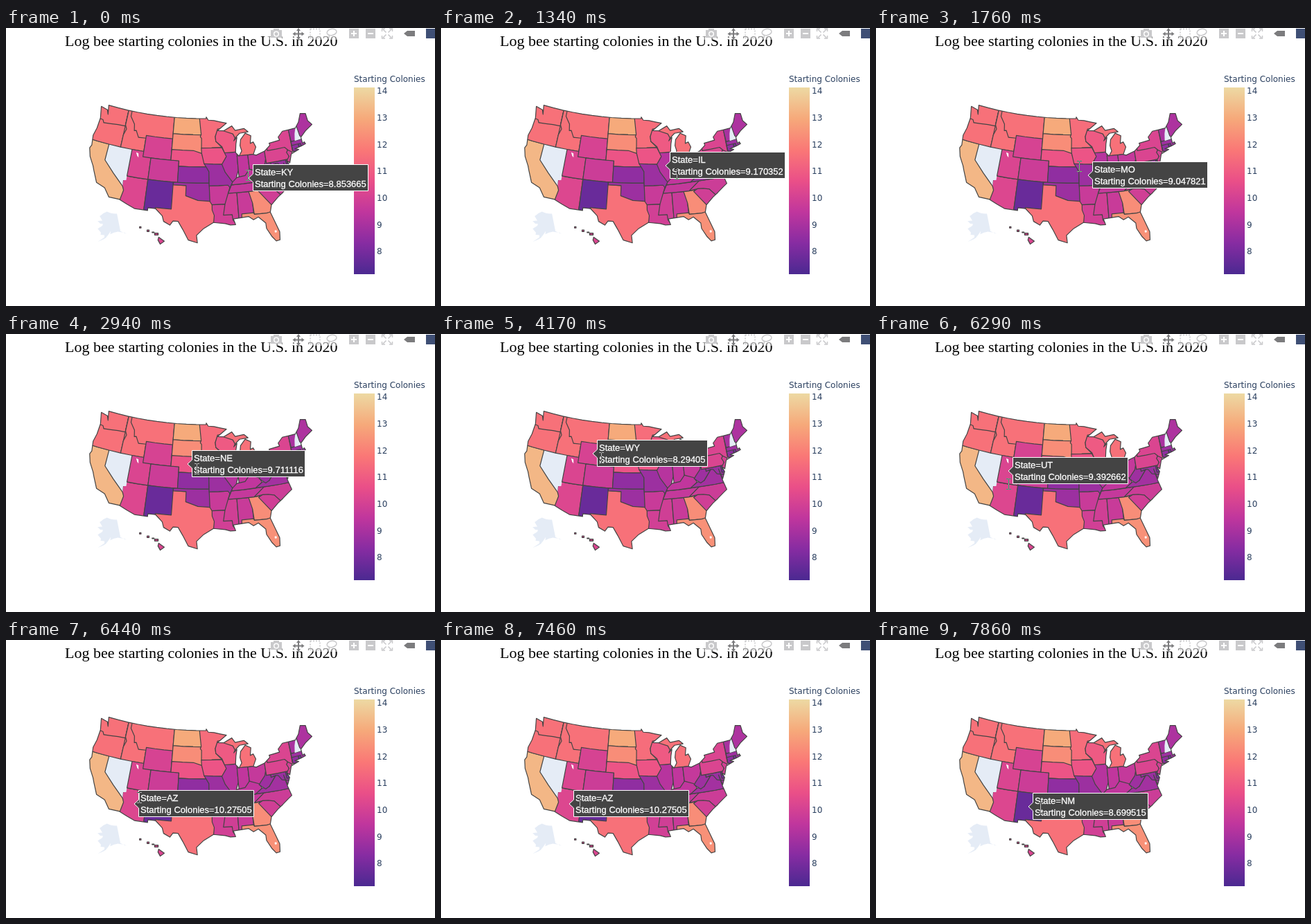
Recreate the animation shown at these times as an HTML page with a canvas. Size 619 px wide and 402 px high, loop 8000 ms.

```html
<!DOCTYPE html>
<html lang="en">
<head>
<meta charset="utf-8">
<title>Bee colonies map</title>
<style>
html, body { margin: 0; width: 100%; height: 100%; overflow: hidden; background: #fff; }
canvas { display: block; }
</style>
</head>
<body>
<canvas id="stage" width="619" height="402"></canvas>
<script>
const W = 619, H = 402, LOOP = 8000;
const LAND = '#e5ecf6', INK = '#444';
const SANS = '"Liberation Sans", Arial, sans-serif';
const SERIF = '"Liberation Serif", "Times New Roman", serif';
const WIDE = '"DejaVu Sans", Verdana, sans-serif';

// Colour scale, from lowest to highest value
const SCALE = [[75, 41, 145], [135, 44, 162], [192, 54, 157], [234, 79, 136],
  [250, 120, 118], [246, 169, 122], [237, 217, 163]];
const LOW = 7.16, HIGH = 14.13;
const BAR = { x: 502, y: 86, w: 30, h: 270 };

function colour(value) {
  const t = (value - LOW) / (HIGH - LOW) * (SCALE.length - 1);
  const i = Math.floor(t);
  return `rgb(${SCALE[i].map((c, k) => Math.round(c + (SCALE[i + 1][k] - c) * (t - i)))})`;
}

// Equal-area conic projection; puts (lonC, latC) at (px, py). West longitudes are positive.
function albers(lon0, p1, p2, k, lonC, latC, px, py) {
  const rad = Math.PI / 180, s1 = Math.sin(p1 * rad);
  const n = (s1 + Math.sin(p2 * rad)) / 2, c = 1 + s1 * (2 * n - s1);
  const raw = (lon, lat) => {
    const r = k * Math.sqrt(c - 2 * n * Math.sin(lat * rad)) / n;
    const a = (lon0 - lon) * n * rad;
    return [r * Math.sin(a), r * Math.cos(a)];
  };
  const mid = raw(lonC, latC);
  return (lon, lat) => {
    const p = raw(lon, lat);
    return [px + p[0] - mid[0], py + p[1] - mid[1]];
  };
}
const mainland = albers(96, 29.5, 45.5, 444.5, 96.6, 38.7, 281, 211.1);
const alaska = albers(154, 55, 65, 155.6, 156, 58.5, 144.9, 300.1);
const hawaii = albers(157, 8, 18, 444.5, 160, 19.9, 190.3, 305);

// Outer edge of the mainland, as "lon,lat" key points
const COAST = [
  '122.8,49 122.3,47.3 122.8,48.1 124.7,48.4 124,46.3 124.1,44.3 124.5,42.8 124.1,41 124.4,40.4 123.7,38.9 122.4,37.4 121.9,36.6 120.6,34.6 118.5,34 117.1,32.5',
  '114.8,32.5 111.1,31.3 108.2,31.3 108.2,31.8 106.5,31.8 104.9,30.6 104.5,29.6 103.1,29 102.5,29.8 101.4,29.8 100.3,28.3 99.1,26.4 97.2,25.9',
  '97.4,27.3 95.9,28.6 93.8,29.7 91.3,29.4 90.2,29.1 89.1,29.1 89.5,30.2 86.2,30.4 85.2,29.7 84.1,30.1 82.7,28.8 82.7,27.8 81.8,26.1 81.1,25.2 80.3,25.3 80.1,26.8 81.4,30.7',
  '80.9,32 79.2,33.2 77.9,33.9 76.5,34.7 75.5,35.2 76,37 76.4,39.2 75.9,37.3 75.1,38.5 75.5,39.5 74.9,39 74.1,40.5 72,41 72.9,41.3 71.2,41.5 70,41.7 70.2,42.1 70.7,41.9 70.7,43.1 69.1,44 67,44.8 67.8,45.7 67.8,47.1 69.2,47.4 70.3,45.9 71.5,45',
  '75,45 76.4,44.1 76.2,43.5 79,43.3 78.9,42.9 80.5,42 82.7,41.5 83.4,41.7 82.5,43 83,44 83.8,43.8 83.4,45.2 84.8,45.8 86.2,44.7 86.5,43.6 86.2,42.6 87,41.7 87.8,42.4 87.5,44 87.1,45.2 88,44.6 87.6,45.1 86.3,45.9 84,46 85,46.7 87.4,46.5 88.2,47.4 90.5,46.6 92.1,46.7 89.6,48 93,48.6 94.6,48.7 95.15,49.3 95.2,49'
].join(' ');

// State cells: value (none: no data), then rough outline; two points give a box.
// Later cells cover earlier ones and the coast trims them all.
const CELLS = {
  AZ: [10.27, '114.75,37 109.05,31'],
  NV: [null, '120,42 114.04,42 114.04,36.2 114.74,36.1 114.6,35 120,39'],
  CA: [13.3, '126,42 120,42 120,39 114.6,35 114.2,34.3 114.7,32 126,32'],
  WA: [11.6, '126,50 117.03,45.6'],
  OR: [11.6, '126,46.3 123.2,46.1 122.8,45.6 119,45.95 116.9,46 116.5,45.5 117,44.3 117,42 126,42'],
  MT: [11.6, '117,50 104.05,44.4'],
  ID: [11.6, '117,50 116.05,50 116.05,48 114.7,46.7 114.4,45.5 113.9,45.6 113,44.4 111.05,44.5 111.05,42 117,42 117,44.3 116.5,45.5 117,46.2'],
  UT: [10.2, '114.04,42 109.05,37'],
  WY: [10.1, '111.05,45 104.05,41'],
  CO: [9.8, '109.05,41 102.05,37'],
  TX: [11.6, '107,36.5 93,25'],
  NM: [7.75, '109.05,37 103.05,37 103.05,32 106.6,32 106.6,31 109.05,31'],
  ND: [13, '104.05,50 96,45.94'],
  SD: [12.3, '104.05,45.94 96,42.3'],
  NE: [10.8, '104.05,43 98.5,43 96.4,42.5 95.3,40 102.05,40 102.05,41 104.05,41'],
  KS: [8.5, '102.05,40 94.62,37'],
  OK: [8.75, '103,37 94.6,37 94.45,33.65 97.2,33.8 100,34.6 100,36.5 103,36.5'],
  MI: [11.6, '90.5,48 82,41.73'],
  IL: [9.3, '92,42.5 87.5,42.5 87.5,39.1 88.1,37.8 88.1,36.9 92,36.9'],
  MN: [11.5, '97.2,50 89,50 89,48 92.1,46.75 92.8,45.6 92.7,44.7 91.2,43.5 96.45,43.5 96.45,45.3 96.8,45.6 96.55,46'],
  WI: [10.95, '92.1,47 90.4,47 90.4,46.55 88.1,45.9 87.6,45.1 86.5,45.3 87,42.5 90.6,42.5 91.2,43.7 92.7,44.7 92.8,45.6'],
  IA: [10.8, '96.5,43.5 91.2,43.5 90.2,41.8 91.4,40.4 95.8,40.6 96.4,42.5'],
  MS: [9.9, '91.7,35 88.3,30'],
  AR: [9.7, '94.6,36.5 89.6,36.5 90.3,35 91.15,33 94.04,33 94.5,33.6'],
  LA: [9.95, '94.04,33 91.15,33 91.6,31 89.7,31 89.6,30 88,28 94,28 93.6,31 94.04,32'],
  MO: [8.75, '95.8,40.6 91.4,40.4 90.7,38.9 89.1,37 89.8,36 90.2,36.5 94.62,36.5 94.62,39.1 95.3,40'],
  AL: [9.7, '88.3,35 85,30'],
  GA: [12.3, '85.6,35 83,35 80,32 80.5,30.6 84.9,30.7 85,32.8'],
  FL: [12.4, '87.6,31 85,31 84.9,30.7 82.2,30.6 81,30.8 79,25 88,25'],
  IN: [9.5, '87.5,41.76 84.8,37.7'],
  OH: [9.6, '84.8,41.73 83.4,41.73 80.52,42.3 80.52,38 84.8,38'],
  TN: [9.6, '90.3,35 84.3,35 81.7,36.6 89.4,36.5'],
  KY: [9.5, '89.4,36.5 83.7,36.6 82,37.5 82.6,38.4 84.8,39.1 86,38 88,37.8 89.1,37'],
  NC: [9.8, '84.3,35 82.3,35.2 79.7,34.8 78,33 75,35 75,36.55 81.7,36.6'],
  SC: [9.9, '83.3,34.8 82.3,35.2 81,35.1 79.7,34.8 78,33 80.9,32 82.6,34'],
  MD: [8.7, '79.48,39.72 75,38'],
  DE: [8, '75.79,39.8 75,38.45'],
  VA: [8.9, '83.7,36.6 75,36.55 75,37.9 77,38.4 77.7,39.3 78.3,39.4 80.3,37.6 82,37.5'],
  WV: [8.8, '82.6,38.2 81.2,37.25 80.3,37.6 78.3,39.4 79.48,39.2 79.48,39.72 80.52,39.72 80.52,40.6 80.9,39.7 82.2,38.6'],
  PA: [10.2, '80.52,42.3 74.8,39.72'],
  NJ: [10, '74.7,41.4 73.8,41 74,39 75.5,39 75.5,39.5 74.75,40.2 75.15,41'],
  NY: [10.2, '79.76,42 75.35,42 74.7,41.4 73.9,40.9 71.5,40.5 71.5,41.2 73.6,41.1 73.35,45.2 79.76,45.2'],
  VT: [9, '73.4,45.1 71.5,42.73'],
  MA: [8.8, '73.45,42.75 69.5,41'],
  CT: [8.5, '73.5,42.03 71.8,40.9'],
  RI: [8, '71.8,42.02 71.2,41.2'],
  NH: [null, '72.45,42.73 72.05,44 71.5,45.01 71.1,45.3 70.6,42.8'],
  ME: [9.1, '71.08,45.3 70.9,43.4 70.5,43 66,44 67,48 71,48']
};
const ALASKA = '141,69.7 141,60.2 136,58.2 133,56 137,59 144,60.2 148,60 152,59.2 151.5,60.8 156.5,57.2 164,54.7 158,57.5 158,58.7 162,58.7 162,59.9 166,61.6 161,63.6 161,64.6 164,64.5 168,65.6 162,66.3 166.5,68.4 161.5,70.3 156.5,71.3 150,70.4';
const ISLES = ['155.9,20.25 154.8,19.5 155.6,18.93 156.05,19.7', '156.7,21 156,20.65',
  '157.2,21.2 156.8,21.1', '158.2,21.6 157.8,21.3', '159.7,22.2 159.4,21.95'];
const LAKES = ['112.9,41.6 112.3,41.5 112.1,40.75 112.5,41', '81.1,27.2 80.7,26.8'];

function outline(g, text, project) {
  let pts = text.split(' ').map(pair => pair.split(',').map(Number));
  if (pts.length === 2) {
    const [[w, n], [e, s]] = pts;
    pts = [[w, n], [e, n], [e, s], [w, s]];
  }
  g.beginPath();
  pts.forEach(([lon, lat], i) => {
    const [lon2, lat2] = pts[(i + 1) % pts.length];
    const steps = Math.ceil(Math.abs(lon2 - lon) / 3) || 1;
    for (let k = 0; k < steps; k++)
      g.lineTo(...project(lon + (lon2 - lon) * k / steps, lat + (lat2 - lat) * k / steps));
  });
  g.closePath();
}

function region(g, text, project, fill, edge) {
  outline(g, text, project);
  g.fillStyle = fill;
  g.fill();
  if (edge) g.stroke();
}

function label(g, text, x, y, font, fill) {
  g.font = font;
  g.fillStyle = fill;
  g.fillText(text, x, y);
}

function drawMap(g) {
  g.strokeStyle = INK;
  g.lineWidth = 1.2;
  g.lineJoin = 'round';
  g.save();
  outline(g, COAST, mainland);
  g.clip();
  for (const [value, cell] of Object.values(CELLS))
    region(g, cell, mainland, value ? colour(value) : LAND, value);
  g.restore();
  outline(g, COAST, mainland);
  g.stroke();
  region(g, ALASKA, alaska, LAND);
  for (const isle of ISLES) region(g, isle, hawaii, colour(10.2), true);
  for (const lake of LAKES) region(g, lake, mainland, '#fff');
}

function drawColorbar(g) {
  const { x, y, w, h } = BAR, font = `12px ${WIDE}`, navy = '#2a3f5f';
  const fade = g.createLinearGradient(0, y + h, 0, y);
  SCALE.forEach((c, i) => fade.addColorStop(i / (SCALE.length - 1), `rgb(${c})`));
  g.fillStyle = fade;
  g.fillRect(x, y, w, h);
  label(g, 'Starting Colonies', x, 78, font, navy);
  for (let v = 8; v <= 14; v++)
    label(g, v, x + w + 3, Math.round(y + h * (HIGH - v) / (HIGH - LOW) + 4), font, navy);
}

function drawToolbar(g) {
  const pale = '#c9c9cb', dark = '#7c7c7e';
  const box = (fill, x, y, w, h) => { g.fillStyle = fill; g.fillRect(x, y, w, h); };
  box('rgba(255,255,255,.5)', 378, 0, W - 378, 17);
  g.lineWidth = 1.5;

  // camera
  box(pale, 382, 3, 16, 11);
  box(pale, 386, 1, 8, 3);
  g.strokeStyle = '#fff';
  g.beginPath(); g.arc(390, 8.5, 3.3, 0, 7); g.stroke();

  // pan: one arrow in each direction
  g.fillStyle = dark;
  for (let i = 0; i < 4; i++) {
    g.save();
    g.translate(422, 8.5);
    g.rotate(i * Math.PI / 2);
    g.fillRect(-1, -6, 2, 6);
    g.beginPath(); g.moveTo(0, -8.5); g.lineTo(3, -4.5); g.lineTo(-3, -4.5); g.fill();
    g.restore();
  }

  // box and lasso select
  g.strokeStyle = pale;
  g.setLineDash([2, 2]);
  g.strokeRect(439, 1.5, 14, 13);
  g.setLineDash([]);
  g.beginPath(); g.ellipse(470, 6, 7, 4.5, -0.2, 0, 7); g.stroke();
  g.beginPath(); g.moveTo(465, 9); g.quadraticCurveTo(468, 12, 465, 15); g.stroke();

  // zoom in and out
  for (const x of [495, 519]) {
    box(pale, x, 1, 14, 14);
    box('#fff', x + 3, 7, 8, 2);
  }
  box('#fff', 501, 4, 2, 8);

  // autoscale
  for (const sx of [-1, 1]) for (const sy of [-1, 1]) {
    const at = (x, y) => [550 + sx * x, 8 + sy * y];
    g.beginPath();
    g.moveTo(...at(1.5, 1.5)); g.lineTo(...at(6, 6));
    g.moveTo(...at(3, 7)); g.lineTo(...at(7.5, 7)); g.lineTo(...at(7.5, 3));
    g.stroke();
  }

  // hover tag and badge
  box(dark, 579, 4, 11, 8);
  g.beginPath(); g.moveTo(574, 8); g.lineTo(579, 4); g.lineTo(579, 12); g.fill();
  box('#3f4f75', 606, 1, 13, 14);
}

function drawScene() {
  const layer = document.createElement('canvas');
  layer.width = W;
  layer.height = H;
  const g = layer.getContext('2d');
  g.fillStyle = '#fff';
  g.fillRect(0, 0, W, H);
  drawMap(g);
  label(g, 'Log bee starting colonies in the U.S. in 2020', 85, 26, `22px ${SERIF}`, '#000');
  drawColorbar(g);
  drawToolbar(g);
  return layer;
}

// Hover labels: start time, state, value, tip position
const HOVERS = [
  [0, 'KY', '8.853665', 350, 217], [1340, 'IL', '9.170352', 324, 199],
  [1490, 'MO', '9.047821', 306, 213], [2820, 'IA', '10.50842', 299, 187],
  [2940, 'NE', '9.711116', 262, 188], [4170, 'WY', '8.29405', 219, 173],
  [5430, 'UT', '9.392662', 191, 198], [6440, 'AZ', '10.27505', 185, 237],
  [7710, 'NM', '8.699515', 220, 241]
];

// Pointer moves: first and last step time, end position
const REST = [349, 213];
const MOVES = [
  [1340, 1760, 293, 200], [2820, 3210, 256, 189], [4020, 4470, 205, 169],
  [5310, 5580, 188, 200], [6140, 6590, 193, 233], [7460, 7860, 237, 243]
];
const STEP = 138;

function pointerAt(t) {
  let [x, y] = REST;
  for (const [start, end, toX, toY] of MOVES) {
    if (t < start) break;
    const gaps = Math.round((end - start) / STEP);
    const done = Math.floor((t - start) / (end - start) * gaps + 0.2);
    const u = Math.min(1, (done + 1) / (gaps + 1)), ease = u * u * (3 - 2 * u);
    x += (toX - x) * ease;
    y += (toY - y) * ease;
  }
  return [Math.round(x), Math.round(y)];
}

function drawHover(g, [, state, value, x, y]) {
  const text = `Starting Colonies=${value}`, font = `13px ${SANS}`;
  g.font = font;
  const left = x + 6.5, right = left + Math.round(g.measureText(text).width + 5.5);
  const top = y - 19.5, bottom = y + 18.5;
  g.beginPath();
  for (const p of [[x, y], [left, y + 6], [left, bottom], [right, bottom], [right, top],
    [left, top], [left, y - 6]]) g.lineTo(...p);
  g.closePath();
  g.fillStyle = INK;
  g.fill();
  g.strokeStyle = '#fff';
  g.lineWidth = 1;
  g.stroke();
  g.lineWidth = 0.3;
  [`State=${state}`, text].forEach((line, i) => {
    label(g, line, x + 9, y - 4 + 17 * i, font, '#fff');
    g.strokeText(line, x + 9, y - 4 + 17 * i);
  });
}

// Text caret pointer that inverts what lies below
function drawPointer(g, [x, y]) {
  g.save();
  g.globalCompositeOperation = 'difference';
  g.fillStyle = '#fff';
  g.fillRect(x, y - 7, 1, 14);
  for (const row of [y - 8, y + 7]) {
    g.fillRect(x - 3, row, 3, 1);
    g.fillRect(x + 1, row, 3, 1);
  }
  g.restore();
}

const stage = document.getElementById('stage').getContext('2d');
const scene = drawScene();

function frame() {
  const t = performance.now() % LOOP;
  stage.drawImage(scene, 0, 0);
  drawHover(stage, HOVERS.filter(h => h[0] <= t).pop());
  drawPointer(stage, pointerAt(t));
  requestAnimationFrame(frame);
}
frame();
</script>
</body>
</html>
```
